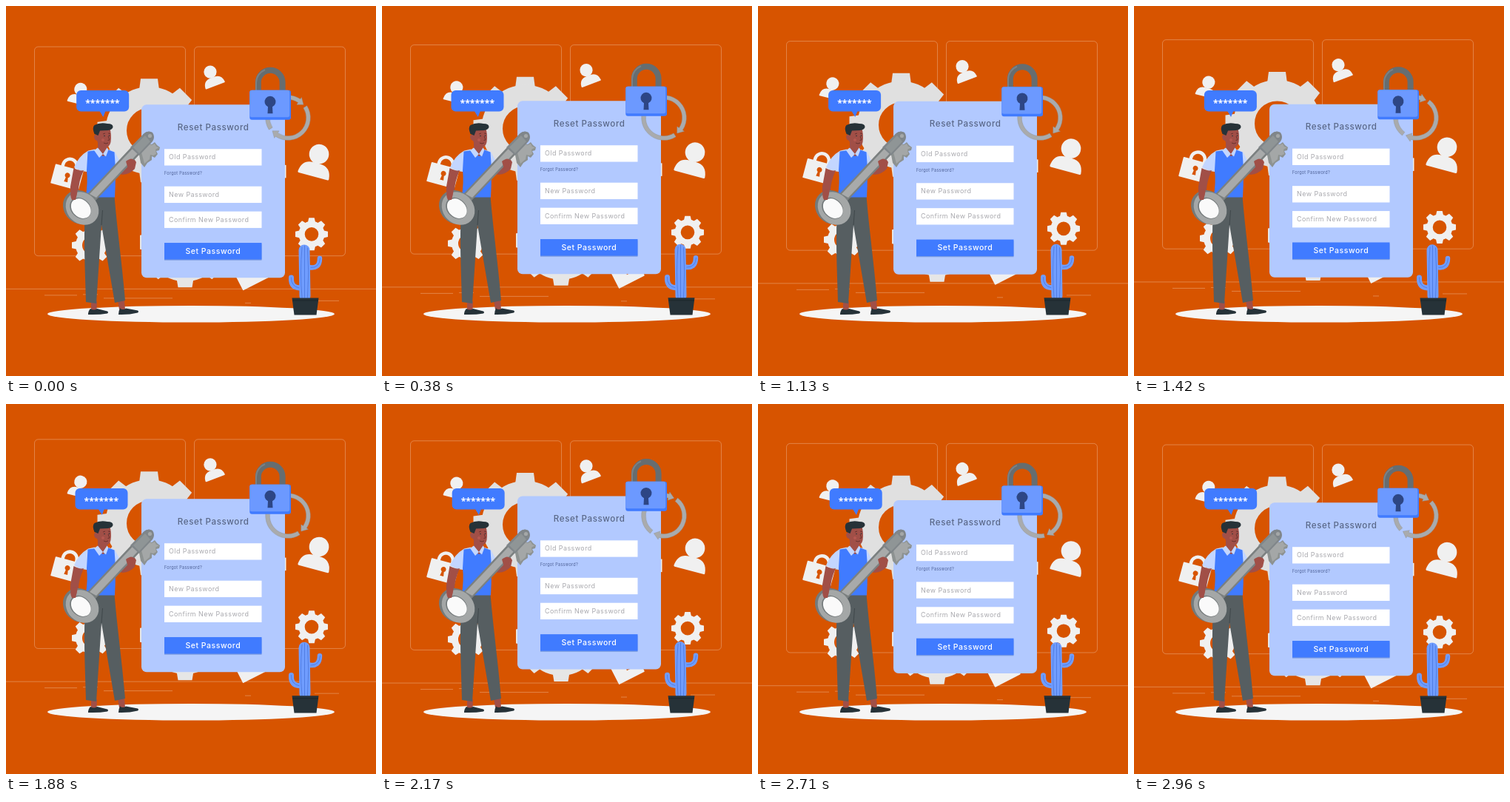
Animation, 500 px wide and 500 px high, one loop 3000 ms. Source, as an HTML page:

```html
<!DOCTYPE html>
<html lang="en">
<head>
<meta charset="utf-8">
<title>Reset Password</title>
<style>
html, body { margin: 0; width: 100%; height: 100%; overflow: hidden; background: #d75400; }
svg { display: block; width: 100%; height: 100%; }
text { font-family: Inter, "Open Sans", sans-serif; letter-spacing: .05em; }
.line { fill: none; stroke: #fff; stroke-opacity: .4; stroke-width: .7; }
.pale { fill: #f0f0f0; }
.skin { fill: #a14f47; }
.blue { fill: #407bff; }
.light { fill: #c3d6ff; }
.dark { fill: #263238; }
.field { fill: #fff; }
.hint { fill: #a9a9ae; font-size: 8.95px; }
.stars { font: 600 12.2px "Noto Sans", sans-serif; letter-spacing: 0; }
</style>
</head>
<body>
<svg viewBox="0 0 500 500">
  <g id="scenery">
    <rect class="line" x="38.5" y="55.2" width="204" height="282.6" rx="5"/>
    <rect class="line" x="254.5" y="55.2" width="204" height="282.6" rx="5"/>
    <path class="line" d="M0 382.5H500"/>
    <path class="line" d="M52 391H96M104 390H124M132 395H225M323 401.5H331M417 398.5H450"/>
    <g id="gears"></g>
    <rect x="366" y="215" width="12.500" height="17.500" class="pale"/>
    <g id="people"></g>
    <g transform="translate(82.500 231) rotate(15)">
      <path d="M-9.500-12V-15a9.500 9.500 0 0 1 19 0V-12" fill="none" stroke="#f0f0f0" stroke-width="4.500"/>
      <rect class="pale" x="-19.500" y="-13" width="39" height="27" rx="1"/>
      <path d="M-1.500 1a3.500 3.500 0 1 1 3 0L2.500 7H-2.500Z" fill="#d75400"/>
    </g>
    <g transform="translate(330 364) rotate(-27)">
      <rect class="pale" x="-18" y="-12" width="39" height="26" rx="1"/>
      <path d="M1-4a3.500 3.500 0 1 1 3 0L5 2H0Z" fill="#d75400"/>
    </g>
  </g>

  <ellipse cx="250" cy="416.300" rx="194" ry="11.300" fill="#f5f5f5"/>

  <g id="form">
    <rect x="183" y="133.600" width="194" height="234" rx="7" fill="#b2c9ff"/>
    <text x="280.200" y="168" text-anchor="middle" font-size="11.600" font-weight="500" fill="#5a6888">Reset Password</text>
    <rect class="field" x="214" y="193.500" width="131.500" height="22.300"/>
    <text class="hint" x="220" y="207.600">Old Password</text>
    <text x="214" y="228.300" font-size="5.500" fill="#4c5f94">Forgot Password?</text>
    <rect class="field" x="214" y="244" width="131.500" height="22.300"/>
    <text class="hint" x="220" y="258.200">New Password</text>
    <rect class="field" x="214" y="277.900" width="131.500" height="22.300"/>
    <text class="hint" x="220" y="292">Confirm New Password</text>
    <rect x="214" y="322" width="131.500" height="22" fill="#7d9de0"/>
    <rect class="blue" x="214" y="320.300" width="131.500" height="22.500"/>
    <text x="279.800" y="335.200" text-anchor="middle" font-size="10.500" font-weight="500" fill="#fff">Set Password</text>
  </g>

  <g id="arrows" fill="#a9abad"></g>

  <g id="lock">
    <path d="M340.800 116V103.500a16.400 16.400 0 0 1 32.800 0V116" fill="none" stroke="#666d70" stroke-width="8"/>
    <path d="M338 115V103.500a19 19 0 0 1 12-17" fill="none" stroke="#7b8184" stroke-width="2"/>
    <rect class="blue" x="329.300" y="114" width="55.700" height="40" rx="3"/>
    <rect x="329.300" y="114" width="54" height="36.500" rx="3" fill="#6c99ff"/>
    <path d="M354 136.500a7.500 7.500 0 1 1 6 0L360.500 145.500H353.500Z" fill="#2d4685"/>
  </g>

  <g id="cactus">
    <g fill="none" stroke-linecap="round">
      <path d="M409 353C419 355 424 351 424 341" stroke="#709dff" stroke-width="6.500"/>
      <path d="M399 381C389 381 385 377 385.500 367" stroke="#709dff" stroke-width="7"/>
      <path d="M403 330L404 392" stroke="#709dff" stroke-width="15"/>
      <path d="M400 326Q397 360 400 394M403.500 324V394M407.500 327Q410 360 407.500 394M412 353.500Q424 354 424.500 341M396 381Q385 379 385.500 367" stroke="#4470d6" stroke-width=".7"/>
    </g>
    <path class="dark" d="M386.500 394.500H422.500L419.500 417.500H389.500Z"/>
    <path d="M387 398H422" stroke="#172125" stroke-width=".7"/>
  </g>

  <g id="man">
    <path class="skin" d="M115 399H123L122.500 411H115ZM151 398H160L161 410H153Z"/>
    <path class="dark" d="M114 409Q119 412 123 409L137 412.500Q139 414 137 415.500Q126 417.500 111 417Q111 412 114 409ZM154 408.500Q158 411.500 162 408.500L178 411.500Q180 413 178 414.500Q166 417.500 152 417Q152 412 154 408.500Z"/>
    <path d="M108 257H146.500C150 300 157 350 161 398L147 401L129 296L122 402L108 400C107 355 104 310 108 257Z" fill="#565e61"/>
    <path d="M129 296L130.500 276" stroke="#3f474a" stroke-width="1"/>
    <path class="light" d="M111 195.500L120 193.500L124 203L109 224Q99 223 92 218Q98 203 111 195.500ZM139 194L147 197L155 212L150 224L141 215Z"/>
    <path class="blue" d="M110.500 196.500L122 195L137 194L146.500 197.500Q149 226 147 258.500H107.500Q111 238 109 222Z"/>
    <path class="skin" d="M124 181H137V195Q134 203 131 203Q127 201 124 195Z"/>
    <path class="light" d="M119 195L124 191.500L131 200L126 205ZM131 200L136.500 191.500L138.500 194L135 203.500Z"/>
    <path class="skin" d="M121 170Q121 164 129 164H140Q143 174 141.500 184Q140 191 134 191Q125.500 190 123 182Q119 181 119 176Q120 173 123 174Z"/>
    <path class="dark" d="M119.500 173Q116 164 119.500 161Q127 157 137 159Q145 159 144.500 164Q143 167.500 138 168L127 168.500L124.500 175L121 173.500Z"/>
    <path d="M131 173L134 172M138 172L141 172.500M138 176L140 181L137.500 181.500M132 185Q135 187 138 185" fill="none" stroke="#5d2a29" stroke-width=".8"/>
    <circle cx="133" cy="175.500" r=".8" class="dark"/><circle cx="139.500" cy="175.300" r=".8" class="dark"/>
    <circle cx="131" cy="181" r="2" fill="#b65850"/>
    <path class="skin" d="M152 226L163 213L172 205L176 211L174 220Q168 227 157 228Z"/>
    <path class="skin" d="M91.500 219Q100 223.500 105 222Q98 238 98 250L102 260L91 264Q86 254 87 244Z"/>
  </g>

  <g id="key">
    <path d="M110 254L184 175Q190 167 197 171Q201 177 198 182L121 263Z" fill="#7b8080"/>
    <path d="M113 254L186 177Q193 171 198 178L122 259Z" fill="#a8aaaa"/>
    <path d="M179 196L188 184L197 187L201 184L204 188L208 191L207 195L203 196L205 200L201 205L197 203L197 208L191 212L187 218L182 212Z" fill="#8d9291"/>
    <path d="M182 194L189 185L197 188L201 186L203 190L207 191L202 194L203 200L199 202L195 201L194 207L187 213Z" fill="#a4a7a7"/>
    <path d="M168 191L186 173Q192 167 198 171Q202 177 198 183L180 202Z" fill="#80868a"/>
    <path d="M172 191L188 175L195 183L180 199Z" fill="#8f9596"/>
    <circle cx="194.500" cy="175.500" r="2.600" fill="#a4a7a7"/>
    <ellipse cx="100" cy="272" rx="21.500" ry="24.500" fill="#747a7b" transform="rotate(-45 100 272)"/>
    <ellipse cx="103" cy="273.500" rx="20.500" ry="24" fill="#a4a7a7" transform="rotate(-45 103 273.500)"/>
    <ellipse cx="100.700" cy="273.300" rx="12.800" ry="16" fill="#747a7b" transform="rotate(-45 100.700 273.300)"/>
    <ellipse cx="101.300" cy="273.600" rx="11.600" ry="15" fill="#fafafa" transform="rotate(-45 101.300 273.600)"/>
    <path class="skin" d="M88 248L97 247Q96 256 94 262L89 262Q86 256 88 248Z"/>
    <path class="skin" d="M162 210Q169 204 173 208L171 215L165 220Z"/>
  </g>

  <g id="bubble">
    <path class="blue" d="M126 141H135L131.500 150Z"/>
    <rect class="blue" x="95.300" y="114" width="71" height="28.600" rx="6"/>
    <text class="stars" x="130.600" y="136.200" text-anchor="middle" fill="#fff">*******</text>
  </g>
</svg>
<script>
const LOOP = 3000, RATE = 24 / 1000, PHASE = 20;
const $ = id => document.getElementById(id);
const move = (id, value) => $(id).setAttribute('transform', value);

function gear(x, y, outer, body, hole, half, color) {
  const tooth = `M${-half - 2} ${4 - body}L${-half} ${-outer}H${half}L${half + 2} ${4 - body}Z`;
  let teeth = '';
  for (let a = 0; a < 360; a += 45) teeth += `<path d="${tooth}" transform="rotate(${a})"/>`;
  return `<g transform="translate(${x} ${y})" fill="${color}">${teeth}
    <circle r="${(body + hole) / 2}" fill="none" stroke="${color}" stroke-width="${body - hole}"/></g>`;
}

function person(x, y, size, tilt) {
  return `<g class="pale" transform="translate(${x} ${y}) rotate(${tilt}) scale(${size})">
    <circle cy="-20" r="8.600"/>
    <path d="M-14 -1Q-13 -12 -3 -12H3Q13 -12 14 -1Q14 0 13 0H-13Q-14 0 -14 -1Z"/></g>`;
}

function arrow() {
  const at = (r, deg) => {
    const a = deg * Math.PI / 180;
    return `${(r * Math.cos(a)).toFixed(2)} ${(r * Math.sin(a)).toFixed(2)}`;
  };
  return `<path d="M${at(30.3, -169)}A30.3 30.3 0 0 1 ${at(30.3, -13)}L${at(33, -13)}L${at(27.5, 3)}
    L${at(21.5, -13)}L${at(24.7, -13)}A24.7 24.7 0 0 0 ${at(24.7, -169)}Z" stroke="#8f9294" stroke-width=".4"/>`;
}

$('gears').innerHTML =
  gear(193.5, 168.5, 70, 59, 30.5, 11.5, '#e0e0e0') +
  gear(242, 319.5, 61, 53, 26, 9.5, '#e6e6e6') +
  gear(115, 323.500, 26, 21, 12, 4, '#f0f0f0') +
  gear(413, 308.500, 22, 17.5, 9.3, 3.7, '#f0f0f0');
$('people').innerHTML =
  person(96, 132, 1, 14) + person(283, 108, 1, -20.5) + person(415, 230.3, 1.55, 15);
$('arrows').innerHTML = arrow() + `<g transform="rotate(180)">${arrow()}</g>`;

// 0 at the ends of a cycle, 1 in the middle, straight in between
const wave = p => 1 - Math.abs(2 * (p % 1) - 1);

const SHAKE = [0, -1, 2, -4, 4, -4, 4, -4, 2, -1, 0];
function shake(p) {
  const k = Math.floor(p * 10), f = p * 10 - k;
  return SHAKE[k] + (SHAKE[k + 1] - SHAKE[k]) * f;
}

function draw(now) {
  const step = Math.floor((now % LOOP) * RATE + .05);
  const time = step / RATE;
  const slow = ((time + PHASE) / LOOP) % 1;
  const fast = (slow * 2) % 1;
  const lift = wave(fast);

  move('scenery', `translate(0 ${-10 * wave(slow)})`);
  move('form', `translate(0 ${-10 * lift})`);
  move('lock', `translate(0 ${-10 * lift})`);
  move('arrows', `translate(381 151) rotate(${-48 + fast * 360})`);
  move('bubble', `translate(${shake(fast)} 0)`);
  move('cactus', `translate(0 417.5) scale(1 ${1 + .016 * lift}) translate(0 -417.5)`);
}

function tick() {
  draw(performance.now());
  requestAnimationFrame(tick);
}
tick();
</script>
</body>
</html>
```
